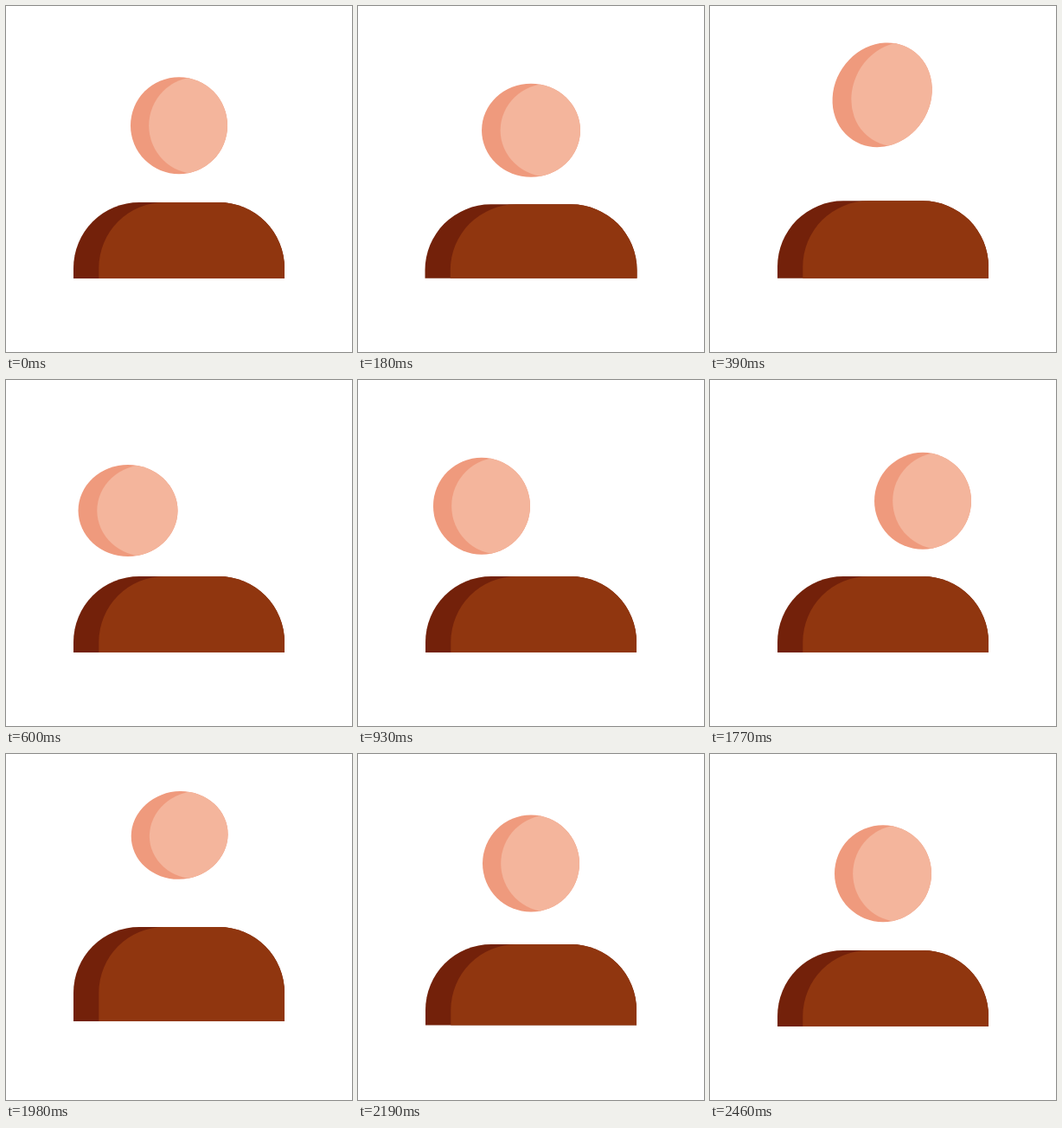
Animation of 400x400 px, one loop 4.52 s. Source, as an HTML page:

```html
<!DOCTYPE html>
<html lang="en">
<head>
<meta charset="utf-8">
<title>Hopping figure</title>
<style>
  html, body { margin: 0; width: 100%; height: 100%; overflow: hidden; background: #fff; }
  svg { display: block; width: 100%; height: 100%; }
</style>
</head>
<body>
<svg viewBox="0 0 400 400">
  <clipPath id="disc"><circle r="56"/></clipPath>
  <path id="shade" fill="#73210a"/>
  <path id="torso" fill="#90360f"/>
  <g id="head">
    <circle r="56" fill="#ef9a7d"/>
    <g clip-path="url(#disc)"><circle cx="21.4" r="56.2" fill="#f4b59c"/></g>
  </g>
</svg>
<script>
const LOOP = 4520, STEP = 30;
const [shade, torso, head] = ['shade', 'torso', 'head'].map(id => document.getElementById(id));

const progress = (t, from, to) => Math.min(1, Math.max(0, (t - from) / (to - from)));

// Smooth change from 0 to 1
function ease(t, from, to) {
  const p = progress(t, from, to);
  return p * p * (3 - 2 * p);
}

// Smooth swell from 0 to 1 and back to 0
const bump = (t, from, to) => Math.sin(Math.PI * progress(t, from, to)) ** 2;

function headPose(t, crouch) {
  const landing = bump(t, 540, 720);
  const squash = crouch + landing;
  const leap = bump(t, 240, 480);      // stretched at the top of the first hop
  const dive = bump(t, 1080, 1350);    // narrow while dropping to the right
  const float = bump(t, 1830, 2130);   // flattened at the top of the last hop
  const goLeft = ease(t, 375, 585);
  const goBack = ease(t, 1680, 2000);

  return {
    x: 200 - 59 * goLeft + 116 * ease(t, 900, 1290) - 57 * goBack,
    y: 138.2 + 11 * crouch + 6 * landing
      - 36 * ease(t, 180, 375) + 44.3 * goLeft
      + 4.5 * ease(t, 900, 1230) - 10 * bump(t, 900, 1200)
      - 57.7 * goBack + 44.9 * ease(t, 2070, 2250),
    along: 1 - .07 * squash + .13 * leap - .093 * float,
    across: 1 + .035 * squash - .01 * leap - .075 * dive,
    tilt: 33 * bump(t, 240, 540) - 29 * dive - 7 * float
  };
}

function shoulders(left, right, top, base) {
  const r = 76;
  return `M${left} ${base}V${top + r}A${r} ${r} 0 0 1 ${left + r} ${top}` +
    `H${right - r}A${r} ${r} 0 0 1 ${right} ${top + r}V${base}Z`;
}

function draw(t) {
  const crouch = bump(t, 0, 240) + .4 * bump(t, 1560, 1740) + bump(t, 2190, 2460);
  const { x, y, along, across, tilt } = headPose(t, crouch);
  head.setAttribute('transform',
    `translate(${x} ${y}) rotate(${tilt}) scale(${across} ${along}) rotate(${-tilt})`);

  const rise = 14 * bump(t, 150, 420) + 27 * (ease(t, 1770, 1980) - ease(t, 2070, 2250));
  const left = 78 - crouch, right = 322 + crouch;
  const top = 227 + 8 * crouch - rise, base = 315 - .22 * rise;
  shade.setAttribute('d', shoulders(left, right, top, base));
  torso.setAttribute('d', shoulders(left + 29.3, right, top, base));
}

const start = performance.now();
function tick() {
  const time = (performance.now() - start) % LOOP;
  draw(Math.floor(time / STEP) * STEP);
  requestAnimationFrame(tick);
}
tick();
</script>
</body>
</html>
```
